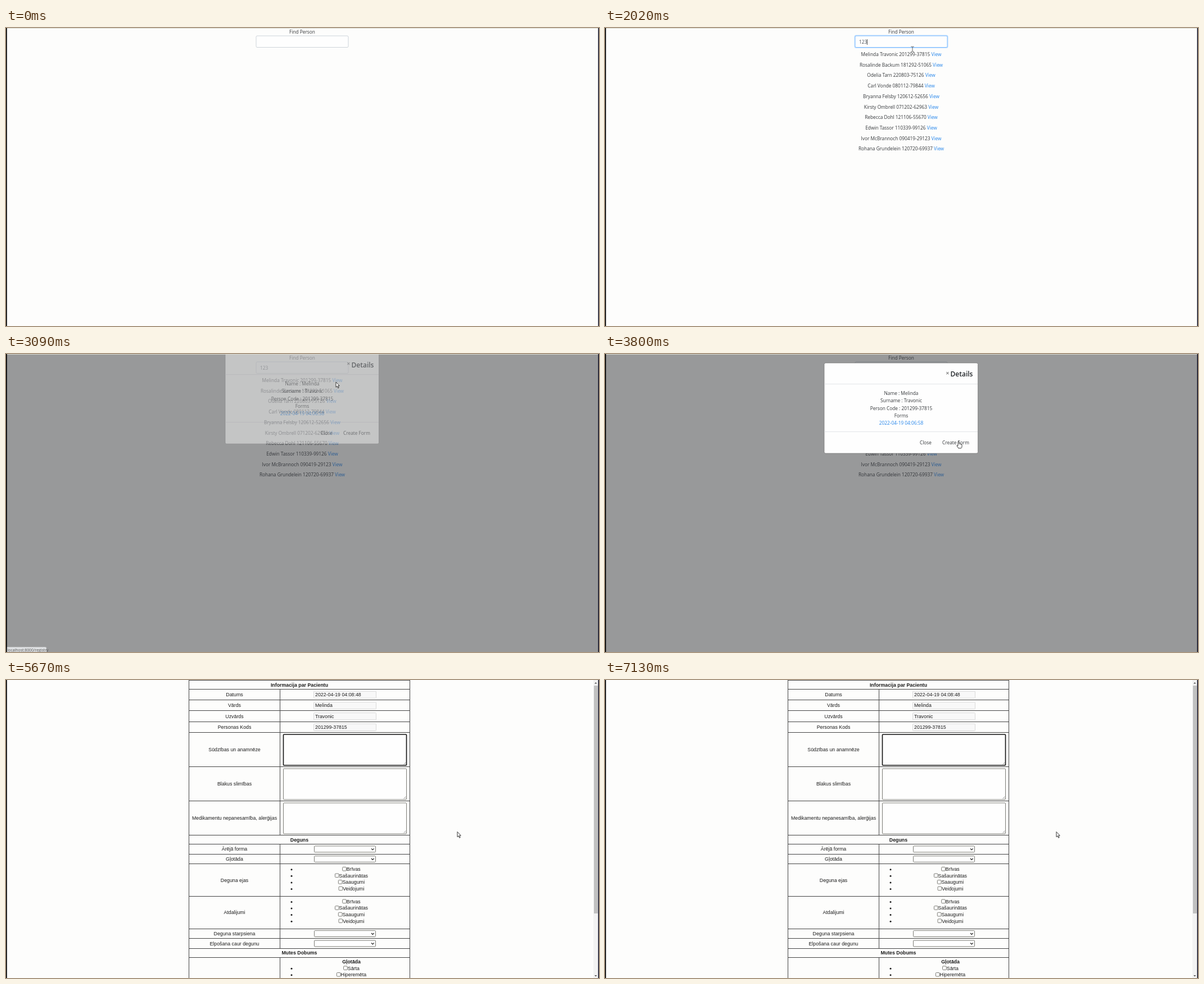
These frames come from a looping animation (1055 by 531 pixels, 7180 ms). An HTML page:

```html
<!DOCTYPE html>
<html lang="en">
<head>
<meta charset="utf-8">
<title>Find Person</title>
<style>
  html, body { margin: 0; width: 100%; height: 100%; overflow: hidden; background: #fdfdfc; }
  svg { display: block; width: 100vw; height: 100vh; }
  text { text-anchor: middle; white-space: pre; }
  .start { text-anchor: start; }
  .b { font-weight: bold; }
  #search { font: 8.3px "Open Sans", "Noto Sans", sans-serif; fill: #34373a; }
  #form { font: 8.8px "Liberation Sans", Arial, sans-serif; fill: #1c1c1c; }
  .link { fill: #2585ea; }
  .grid { stroke: #444; fill: none; }
  .field { fill: #fefefe; stroke: #7c7c76; }
  .off { fill: #f8f8f8; stroke: #dadada; }
  .sep { stroke: #e3e5e8; }
  .cursor path { fill: #fff; stroke: #222; stroke-width: .9; stroke-linejoin: round; }
</style>
</head>
<body>
<svg viewBox="0 0 1055 531" preserveAspectRatio="none">
  <g id="search">
    <rect id="glow" x="443.5" y="12.5" width="167" height="23.5" rx="3" fill="#bfdeff"/>
    <rect id="input" x="445" y="14" width="164" height="20.5" rx="2" fill="#fefefe"/>
    <text x="527" y="10.4">Find Person</text>
    <text id="typed" class="start" x="452" y="28" fill="#495057"></text>
    <path id="caret" d="M0 20V30" stroke="#222" stroke-width=".8"/>
    <g id="rows"></g>
    <rect id="shade" width="1055" height="531"/>
    <g id="modal">
      <rect x="390" y="16" width="273.5" height="161" rx="2.5" fill="#fefefe" stroke="#666" stroke-width=".6"/>
      <path class="sep" d="M390.5 53.5H663M390.5 138.5H663"/>
      <text x="609.3" y="37.5" font-size="11" font-weight="600" fill="#777">×</text>
      <text x="634.5" y="40.4" font-size="12" font-weight="600" fill="#212529">Details</text>
      <g id="details"></g>
      <text x="570.5" y="161">Close</text>
      <text x="624" y="161">Create Form</text>
    </g>
    <path d="M0 .5H1055" stroke="#d9d9d0"/>
    <g id="status">
      <path d="M0 522H70Q72 522 72 524V531H0Z" fill="#dfe1e3" stroke="#aaa" stroke-width=".6"/>
      <text class="start" x="2.5" y="529.6" font-size="6.9" fill="#555">localhost:8000/registry</text>
    </g>
  </g>
  <g id="form">
    <g id="page"></g>
    <rect x="1045" width="8.5" height="531" fill="#f3f3f3"/>
    <rect id="thumb" x="1046" y="10" width="7" height="406" fill="#c1c1c1"/>
    <path d="M1047 6.5L1049.2 4 1051.4 6.5ZM1047 526L1049.2 528.5 1051.4 526Z" fill="#555"/>
  </g>
  <path d="M0 0H1.7V531H0Z" fill="#000"/>
  <path d="M1053.5 0H1055V531H1053.5Z" fill="#0c0c20"/>
  <g id="pointer" class="cursor">
    <path id="arrow" d="M0 0V9.2L2.1 7.3 3.7 10.8 5.2 10.1 3.6 6.7H6.3Z"/>
    <path id="hand" d="M-1 .8Q0-.6 1 .8V4.6Q2.2 3.8 2.9 5 4 4.4 4.6 5.6 6 5.2 6 6.8V9Q6 11.5 4.6 12.4H-.2Q-1.4 10.6-3 8.2-3.4 6.6-1 7.8Z"/>
    <path id="ibeam" d="M-2.6-4.3H-.6L0-3.6.6-4.3H2.6M0-3.6V3.9M-2.6 4.6H-.6L0 3.9.6 4.6H2.6" style="fill:none;stroke:#555"/>
  </g>
</svg>
<script>
const LOOP = 7180, MAX_SCROLL = 141;
const $ = id => document.getElementById(id);
const set = (id, attrs) => { for (const k in attrs) $(id).setAttribute(k, attrs[k]); };
const show = (id, on) => { $(id).style.display = on ? '' : 'none'; };

// ---- search page ----
const people = [
  'Melinda Travonic 201299-37815', 'Rosalinde Backum 181292-51065',
  'Odelia Tarn 220803-75126', 'Carl Vonde 080112-79844',
  'Bryanna Felsby 120612-52656', 'Kirsty Ombrell 071202-62963',
  'Rebecca Dohl 121106-55670', 'Edwin Tassor 110339-99126',
  'Ivor McBrannoch 090419-29123', 'Rohana Grundelein 120720-69937'
];
$('rows').innerHTML = people.map((p, i) =>
  `<text x="527" y="${50 + i * 18.7}">${p} <tspan class="link">View</tspan></text>`).join('');
$('details').innerHTML = ['Name : Melinda', 'Surname : Travonic', 'Person Code : 201299-37815',
  'Forms', '2022-04-19 04:06:58'].map((s, i) =>
  `<text x="527" y="${73.1 + i * 13.2}" ${i == 4 ? 'class="link"' : ''}>${s}</text>`).join('');

// ---- form page ----
const text = (x, y, s, cls = '') => `<text class="${cls}" x="${x}" y="${y + 3.1}">${s}</text>`;
const box = (x, y, w, h, cls, id = '') =>
  `<rect id="${id}" class="${cls}" x="${x}" y="${y}" width="${w}" height="${h}" rx="1"/>`;
const label = (y, s) => text(406.5, y, s);
const heading = (y, s) => text(522, y, s, 'b');
const field = (y, name, value) => label(y, name) +
  box(547.5, y - 6, 111, 12.5, 'off') + text(550, y, value, 'start');
const area = (y, name, id) => label(y, name) + box(493.5, y - 27, 219, 55, 'field', id) +
  `<path d="M707.5 ${y + 26.5}l4-4M710 ${y + 26.5}l1.5-1.5" stroke="#777" stroke-width=".7"/>`;
const select = (y, x = 548.5) => box(x, y - 5.5, 109, 11, 'field') +
  `<path d="M${x + 101.5} ${y - 1}l2.3 2.3 2.3-2.3" fill="none" stroke="#222" stroke-width="1.2"/>`;
const list = (y, items) => items.split(' ').map((s, i) => {
  const cy = y + i * 11.6;
  return `<circle cx="508" cy="${cy + .7}" r="1.5"/><g class="item">` +
    box(0, cy - 3.6, 6.6, 6.6, 'field') + text(618.3, cy, s) + '</g>';
}).join('');

const lines = [.5, 16.5, 35.5, 54.5, 74.5, 93.5, 154.5, 215.5, 276.5, 292.5, 310.5, 327.5,
  385.5, 443.5, 460.5, 478.5, 494.5, 611.5, 640.5];
const nose = 'Brīvas Sašaurinātas Saaugumi Veidojumi';
$('page').innerHTML =
  `<path class="grid" d="${lines.map(y => `M325 ${y}H719`).join('')}M325.5 0V641M718.5 0V641` +
  'M487.5 16V277M487.5 292V479M487.5 494V641"/>' +
  heading(8.5, 'Informacija par Pacientu') +
  field(26, 'Datums', '2022-04-19 04:08:48') + field(45.3, 'Vārds', 'Melinda') +
  field(64.5, 'Uzvārds', 'Travonic') + field(84, 'Personas Kods', '201299-37815') +
  area(124, 'Sūdzības un anamnēze', 'notes') + area(185, 'Blakus slimības') +
  area(246, 'Medikamentu nepanesamība, alerģijas') +
  heading(284.5, 'Deguns') +
  label(301.3, 'Ārējā forma') + select(301.3) + label(319, 'Gļotāda') + select(319) +
  label(356.5, 'Deguna ejas') + list(337, nose) +
  label(414, 'Atdalijumi') + list(394.7, nose) +
  label(452, 'Deguna starpsiena') + select(452) +
  label(469.5, 'Elpošana caur degunu') + select(469.5) +
  heading(486, 'Mutes Dobums') + label(553, 'Rīkle') +
  text(614.5, 502, 'Gļotāda', 'b') + list(513.5, 'Sārta Hiperemēta Cianotiska Bāla') +
  text(614.5, 563.5, 'Rīkle', 'b') + list(575, 'Tūskaina Atrofiska Hipertrofiska') +
  label(626, 'Mandeles') + text(547.3, 620.3, 'Mandeles') + select(620.5, 569) +
  text(547.3, 632, 'Aplikums') + select(632, 568) +
  '<rect x="506.5" y="642.5" width="31" height="12" rx="1" fill="#efefef" stroke="#858585"/>' +
  text(522, 648.4, 'Submit') +
  '<text x="522" y="671.2" font-size="8.3" fill="#3b7fc4">Back</text>';

// put each checkbox right before its centred label
document.querySelectorAll('.item').forEach(g => {
  const [check, name] = g.children;
  check.setAttribute('x', 614.5 - (name.getComputedTextLength() + 7.5) / 2 + .4);
});

// ---- timeline ----
const ramp = (t, a, b) => Math.min(1, Math.max(0, (t - a) / (b - a)));
const smooth = k => k * k * (3 - 2 * k);
const easeOut = k => 1 - (1 - k) ** 2;
const path = [
  [140, 1053, 531], [230, 1050, 528], [420, 1050, 528], [1100, 547, 37.5], [2120, 547, 37.5],
  [2720, 587, 50], [3300, 587, 50], [3720, 629, 155.5], [4400, 629, 155.5], [4650, 625, 154.5],
  [4950, 625, 154.5], [5150, 612, 128], [5300, 612, 128], [5610, 803, 270.5]
];
const shapes = [[0, 'arrow'], [1050, 'ibeam'], [2450, 'arrow'], [2690, 'hand'], [2866, 'arrow'],
  [3640, 'hand'], [4400, 'arrow'], [5020, 'ibeam'], [5400, 'arrow']];
const FOCUS = 1200, CLICK = 2866, PAGE = 4400, NOTES = 5220;

function position(t) {
  let [, x, y] = path[0];
  for (let i = 1; i < path.length; i++) {
    const [a, x0, y0] = path[i - 1], [b, x1, y1] = path[i];
    const k = smooth(ramp(t, a, b));
    x += (x1 - x0) * k;
    y += (y1 - y0) * k;
  }
  return [x, y];
}

function draw(t) {
  show('search', t < PAGE);
  show('form', t >= PAGE);

  const focus = ramp(t, FOCUS, FOCUS + 150) - ramp(t, CLICK, CLICK + 80);
  const count = [1450, 1600, 1750].filter(k => t >= k).length;
  set('glow', { opacity: focus });
  set('input', { stroke: focus > .5 ? '#80bdff' : '#ced4da' });
  $('typed').textContent = '123'.slice(0, count);
  show('caret', t >= FOCUS && t < CLICK);
  set('caret', { transform: `translate(${452.3 + count * 4.7} 0)` });
  show('rows', t >= 1950);
  show('status', t >= 2690 && t < 3250);

  set('shade', { opacity: .5 * ramp(t, CLICK, CLICK + 150) });
  const open = CLICK + 160;
  set('modal', {
    opacity: ramp(t, open, open + 150),
    transform: `translate(0 ${-27.5 * (1 - easeOut(ramp(t, open, open + 300)))})`
  });

  const scroll = smooth(ramp(t, 5740, 6080)) - smooth(ramp(t, 6500, 6850));
  set('page', { transform: `translate(0 ${-MAX_SCROLL * scroll})` });
  set('thumb', { y: 10 + 107 * scroll });
  $('notes').style.cssText = t >= NOTES ? 'stroke:#111;stroke-width:1.6' : '';

  const shape = shapes.filter(s => t >= s[0]).pop()[1];
  for (const id of ['arrow', 'hand', 'ibeam']) show(id, id == shape);
  show('pointer', t >= 140);
  set('pointer', { transform: `translate(${position(t)})` });
}

const begin = performance.now();
function tick() {
  draw((performance.now() - begin) % LOOP);
  requestAnimationFrame(tick);
}
tick();
</script>
</body>
</html>
```
